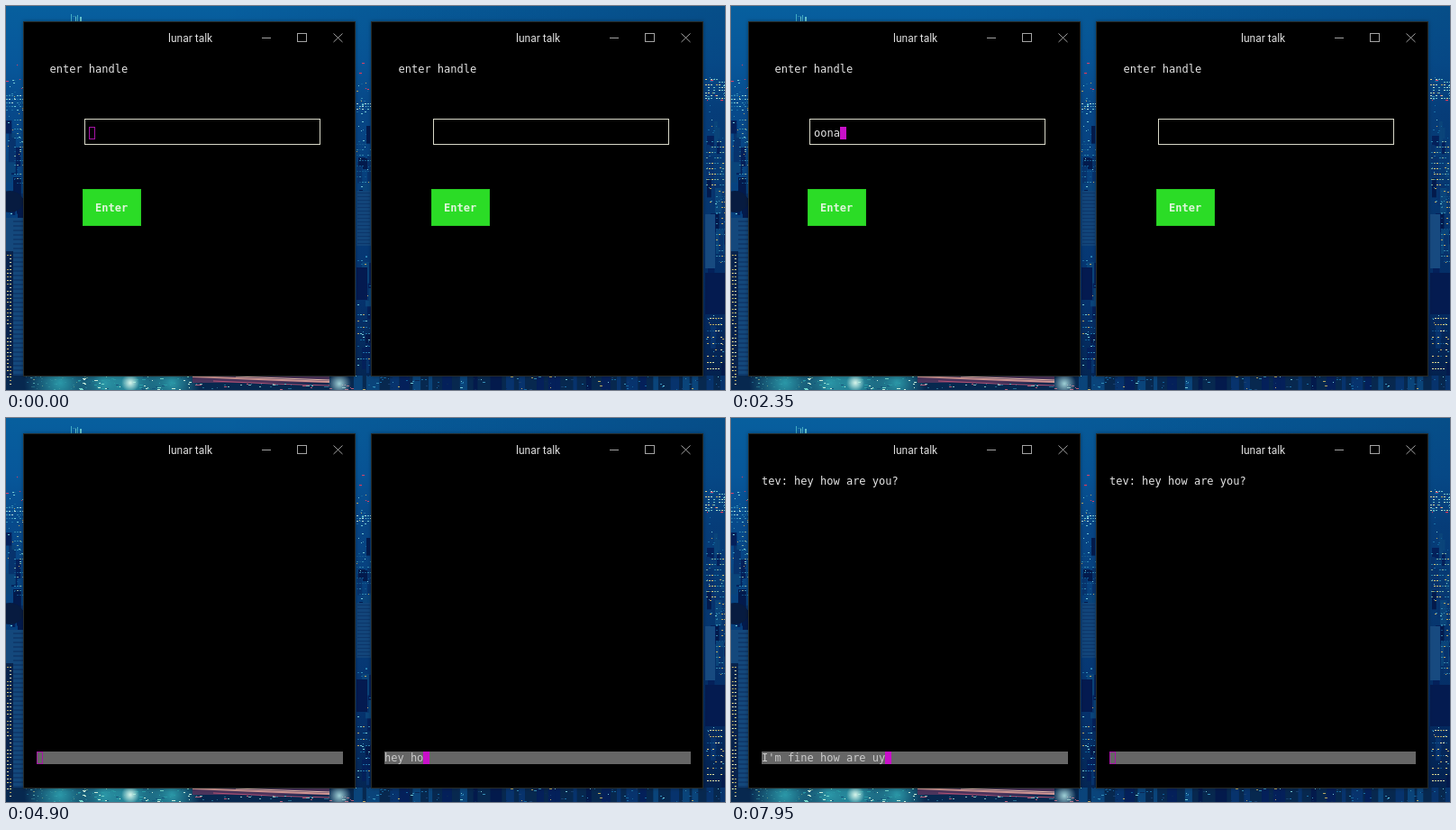
Recreate the animation shown at these times as an HTML page with a canvas. Size 798 px wide and 426 px high, loop 8000 ms.

```html
<!DOCTYPE html>
<html lang="en">
<head>
<meta charset="utf-8">
<title>Chat windows</title>
<style>
html, body { margin: 0; width: 798px; height: 426px; overflow: hidden; background: #06376b; }
canvas { display: block; }
</style>
</head>
<body>
<canvas id="stage" width="798" height="426"></canvas>
<script>
const W = 798, H = 426, LOOP = 8000, STEP = 50;
const SECOND_X = 386, SECOND_FORM_X = 387;
const TITLE = 'lunar talk', LEFT_NAME = 'oona', RIGHT_NAME = 'tev';
const QUESTION = 'hey how are you?';
const MONO = '12px "DejaVu Sans Mono", monospace';
const MAGENTA = '#c810c8';

const ctx = document.getElementById('stage').getContext('2d', { alpha: false });
const city = document.createElement('canvas');
city.width = W;
city.height = H;

let seed = 11;
const random = () => (seed = (seed * 16807) % 2147483647) / 2147483647;
const between = (a, b) => a + random() * (b - a);
const pick = list => list[Math.floor(random() * list.length)];

function box(c, color, x, y, w, h) {
  c.fillStyle = color;
  c.fillRect(x, y, w, h);
}

function outline(c, color, x, y, w, h) {
  c.strokeStyle = color;
  c.strokeRect(x + .5, y + .5, w - 1, h - 1);
}

function line(c, color, ...p) {
  c.strokeStyle = color;
  c.beginPath();
  for (let i = 0; i < p.length; i += 2) c.lineTo(p[i], p[i + 1]);
  c.stroke();
}

function text(s, x, y, color = '#e4e4e4', font = MONO) {
  ctx.font = font;
  ctx.fillStyle = color;
  ctx.fillText(s, x, y);
}

function lights(c, x, y, w, h, count, colors, maxWidth = 2) {
  for (let i = 0; i < count; i++)
    box(c, pick(colors), Math.floor(between(x, x + w)), Math.floor(between(y, y + h)),
      Math.ceil(random() * maxWidth), 1);
}

// Lit floors of one building
function floors(c, x, y, w, h, gap, colors) {
  for (let row = y; row < y + h; row += gap)
    for (let col = x; col < x + w; col += 3)
      if (random() < .72) box(c, pick(colors), col, row, 2, 1);
}

// Soft round glow clipped to the bottom street
function glow(c, color, x, y, r) {
  const g = c.createRadialGradient(x, y, 0, x, y, r);
  g.addColorStop(0, color);
  g.addColorStop(1, color + '00');
  box(c, g, x - r, 410, r * 2, 16);
}

function drawCity(c) {
  const sky = c.createLinearGradient(0, 0, 0, H);
  [[0, '#075f9e'], [.15, '#07579a'], [.28, '#07498a'], [.5, '#07427f'], [.75, '#053572'], [1, '#042550']]
    .forEach(([at, color]) => sky.addColorStop(at, color));
  box(c, sky, 0, 0, W, H);
  const shade = c.createLinearGradient(0, 0, W, 0);
  shade.addColorStop(.3, 'rgba(0,10,50,0)');
  shade.addColorStop(1, 'rgba(0,10,50,.2)');
  box(c, shade, 0, 0, W, H);

  const cool = ['#73c9d4', '#368db5', '#1b6da4', '#b7dedb'];
  const warm = ['#e7d486', '#b9a864', '#f1e6ae'];
  const mixed = ['#368db5', '#1b6da4', '#126399', '#73c9d4', '#b9a864'];
  const dark = ['#04205a', '#031a4c', '#07336d', '#0a447a'];

  for (const [x, w] of [[0, 19], [389, 17], [776, 22]]) {
    for (let i = 0; i < 28; i++)
      box(c, pick(dark), Math.floor(between(x, x + w - 3)), Math.floor(between(118, 400)),
        between(3, 9), between(8, 30));
    lights(c, x, 78, w, 40, 14, mixed);
    lights(c, x, 118, w, 290, 45, mixed);
    lights(c, x, 62, w, 48, 4, ['#ee3855', '#d94369'], 3);
  }

  // Left skyline
  floors(c, 0, 99, 19, 18, 4, cool);
  floors(c, 9, 126, 10, 72, 5, ['#2f85ac', '#114f86', '#7fa8a0']);
  c.fillStyle = '#071b40';
  c.beginPath();
  c.ellipse(4, 217, 15, 12, 0, 0, 7);
  c.fill();
  box(c, '#14487c', 0, 235, 19, 176);
  for (let y = 238; y < 411; y += 5) box(c, '#0f3a6c', 8, y, 11, 2);
  box(c, '#08234c', 0, 272, 8, 154);
  floors(c, 1, 276, 6, 148, 4, warm);

  // Middle skyline
  floors(c, 389, 108, 16, 11, 3, cool);
  floors(c, 389, 153, 16, 48, 6, ['#2f85ac', '#13578b']);
  box(c, '#12457a', 389, 205, 16, 61);
  for (let y = 207; y < 264; y += 4) box(c, '#0c366a', 390, y, 14, 1);
  box(c, '#041a50', 389, 290, 12, 36);
  floors(c, 390, 342, 14, 62, 7, mixed);

  // Right skyline
  floors(c, 776, 81, 22, 22, 3, ['#b8dfc9', '#71bfc4', '#dfcf91']);
  floors(c, 777, 150, 20, 50, 6, ['#78a99d', '#297fa8', '#d1c477']);
  box(c, '#174a80', 776, 231, 11, 60);
  floors(c, 788, 205, 10, 84, 6, ['#b9a864', '#3382a6', '#104d81']);
  box(c, '#041b50', 776, 296, 22, 46);
  floors(c, 778, 346, 18, 60, 7, [...warm, '#15548a']);

  // Streets along the bottom
  box(c, '#07284f', 0, 410, W, 16);
  floors(c, 1, 411, 6, 15, 4, warm);
  lights(c, 20, 410, 70, 16, 45, ['#9b925f', '#28566d', '#1c5c80', '#5fa9ac']);
  for (const [x, r] of [[60, 40], [110, 32], [139, 42], [184, 32]]) glow(c, '#2b98a8', x, 418, r);
  lights(c, 78, 410, 135, 16, 80, ['#72d7cc', '#2a9ba6', '#c7eddb', '#15577c'], 4);
  glow(c, '#d8f4ea', 138, 418, 10);
  box(c, '#4b345c', 207, 410, 152, 8);
  c.lineWidth = 2;
  line(c, '#d19793', 207, 411, 280, 414, 359, 417);
  c.lineWidth = 1;
  line(c, '#b55174', 230, 416, 295, 419, 359, 421);
  line(c, '#e8beb0', 255, 411, 359, 415);
  lights(c, 210, 419, 178, 7, 40, ['#266b8c', '#b65d78', '#83b9ba'], 4);
  glow(c, '#9fd0d6', 370, 419, 13);
  for (let x = 386; x < W; x += between(8, 20))
    box(c, pick(dark), x, 410, between(4, 13), 16);
  lights(c, 386, 410, 412, 16, 110, [...mixed, '#173f70', '#0a2857'], 3);

  // Soften the distant lights
  c.filter = 'blur(.6px)';
  c.drawImage(c.canvas, 0, 0);
  c.filter = 'none';

  // Rooftop mast
  box(c, '#43adc6', 72, 9, 1, 8);
  box(c, '#267da9', 74, 11, 4, 1);
  box(c, '#65c4cf', 77, 12, 1, 5);
  box(c, '#43adc6', 79, 10, 1, 7);
  box(c, '#65c4cf', 82, 12, 2, 5);

  for (const x of [20, 20 + SECOND_X]) {
    c.shadowColor = 'rgba(0,0,0,.35)';
    c.shadowBlur = 4;
    box(c, '#000', x - 1, 17, 369, 394);
    c.shadowBlur = 0;
    outline(c, '#262a28', x - 1, 17, 369, 394);
  }
}

function caret(x, y, focused) {
  if (focused) box(ctx, MAGENTA, x, y, 7, 14);
  else outline(ctx, '#a514a5', x, y, 7, 14);
}

function field(s, x, y, focused, color) {
  text(s, x, y + 11, color);
  if (focused !== null) caret(x + Math.round(ctx.measureText(s).width), y, focused);
}

function drawWindow(x, formX, { chat, input, focused, message }) {
  ctx.save();
  ctx.translate(x, 0);
  text(TITLE, 180, 40, '#dedede', '12px Roboto, sans-serif');
  const gray = '#a2a2a2';
  line(ctx, gray, 284, 35.5, 294, 35.5);
  outline(ctx, gray, 323, 30, 11, 10);
  line(ctx, gray, 363.5, 30.5, 373.5, 40);
  line(ctx, gray, 373.5, 30.5, 363.5, 40);

  if (chat) {
    if (message) text(message, 34, 74);
    box(ctx, '#666', 34, 370, 340, 14);
    field(input, 34, 370, focused, '#cbcbcb');
  } else {
    ctx.translate(formX - x, 0);
    text('enter handle', 48.5, 74);
    outline(ctx, '#d8d8c8', 87, 125, 262, 29);
    field(input, 92, 134, focused);
    box(ctx, '#2bdc26', 85, 203, 65, 41);
    ctx.setLineDash([1, 1]);
    outline(ctx, '#24b820', 85, 203, 65, 41);
    ctx.setLineDash([]);
    text('Enter', 99, 228, '#e0f5dc', 'bold ' + MONO);
  }
  ctx.restore();
}

function typed(s, t, start, end) {
  const part = Math.max(0, Math.min(1, (t - start) / (end - start)));
  return s.slice(0, Math.floor(part * s.length + 1e-6));
}

function draw(now) {
  const t = Math.floor(now % LOOP / STEP) * STEP;
  const leftChat = t >= 2400, rightChat = t >= 3950, sent = t >= 6000;
  const leftActive = t >= 900 && t < 2850 || t >= 6400;
  const rightActive = t >= 2850 && t < 6400;
  const message = sent ? `${RIGHT_NAME}: ${QUESTION}` : '';
  const reply = typed("I'", t, 6650, 6850) + typed('m fine how ', t, 6850, 7800) +
    typed('are uy', t, 7800, 7950);
  const question = typed(QUESTION.slice(0, -1), t, 4300, 5800) + typed('?', t, 5800, 5900);

  ctx.drawImage(city, 0, 0);
  drawWindow(0, 0, {
    chat: leftChat,
    input: leftChat ? reply : typed(LEFT_NAME, t, 1450, 2050),
    focused: leftActive,
    message
  });
  drawWindow(SECOND_X, SECOND_FORM_X, {
    chat: rightChat,
    input: sent ? '' : rightChat ? question : typed(RIGHT_NAME, t, 3250, 3700),
    focused: t < 2850 ? null : rightActive,
    message
  });
}

drawCity(city.getContext('2d'));
const start = performance.now();
function tick() {
  draw(performance.now() - start);
  requestAnimationFrame(tick);
}
tick();
</script>
</body>
</html>
```
